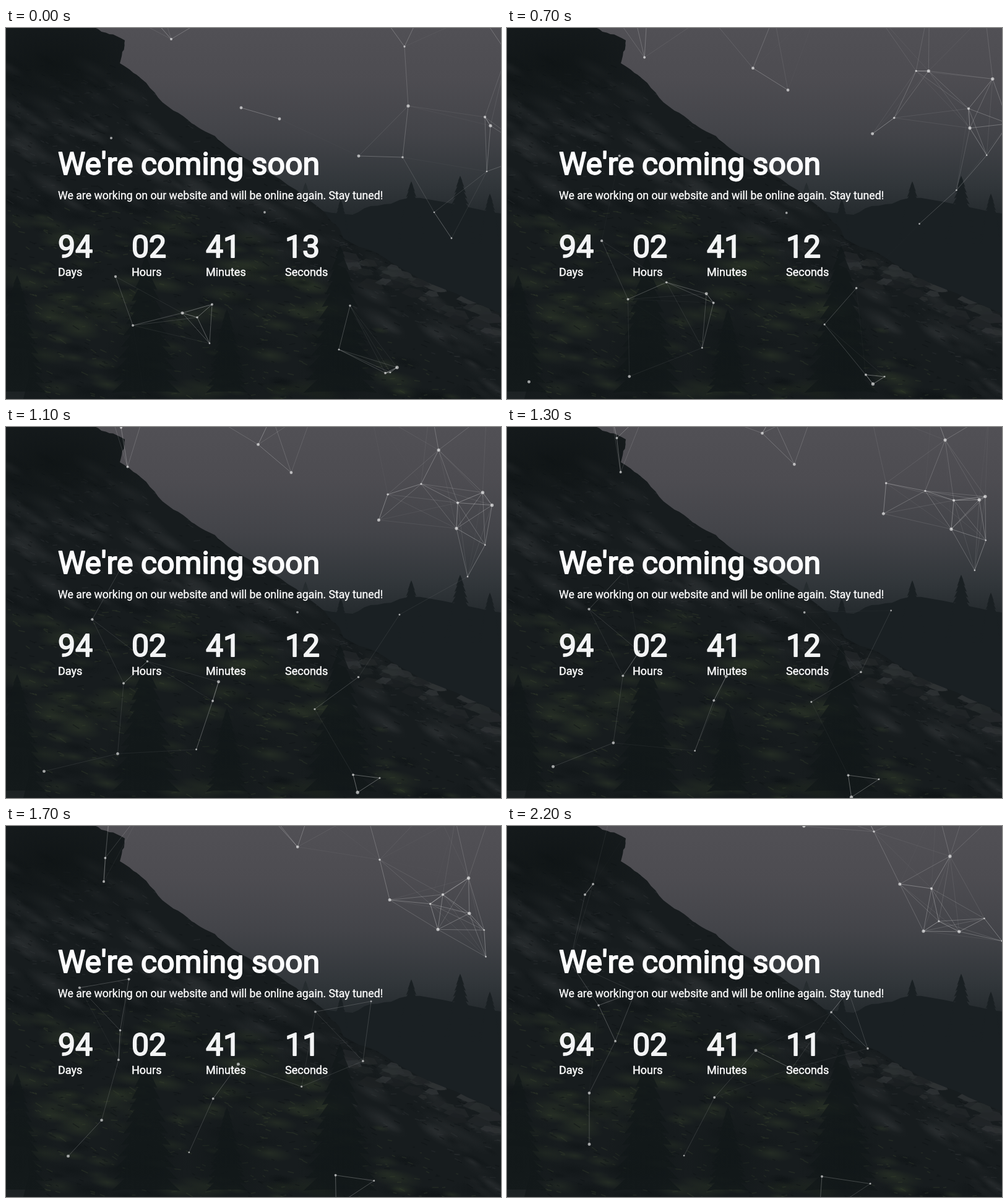
Recreate the animation shown at these times as an HTML page with a canvas. Size 800 px wide and 600 px high, loop 2.3 s.

```html
<!DOCTYPE html>
<html lang="en">
<head>
<meta charset="utf-8">
<title>Coming soon</title>
<style>
html, body { margin: 0; width: 100%; height: 100%; overflow: hidden; background: #161b1d; }
canvas { display: block; width: 800px; height: 600px; }
</style>
</head>
<body>
<canvas id="stage" width="800" height="600"></canvas>
<script>
const W = 800, H = 600, LOOP = 2300, STEP = 100, REACH = 150;
const ctx = document.getElementById('stage').getContext('2d');

function seeded(seed) {
  return (lo = 0, hi = 1) => {
    seed = (seed * 1664525 + 1013904223) % 4294967296;
    return lo + (hi - lo) * seed / 4294967296;
  };
}

// Start point and velocity per step of the leading dots
const leads = [
  [644, 30, 2.45, 5.64], [650, 126, 4.47, -8.07], [774, 144, -4, -1.95], [783, 158, -5, .55],
  [777, 232, -.25, -3.75], [570, 207, 2.95, -5.14], [641, 209, -2.18, -9.09], [692, 298, 4.91, -5.09],
  [720, 340, -7.64, -3.32], [855, 204, -6.32, -7.05], [810, 41, -3.6, 5.9],
  [267, 18, -6.41, 4.23], [233, -92, -4.27, 8.45], [170, 178, 1.68, 4.1], [177, 402, -3.42, -8.26],
  [380, 129, 2.5, -9.15], [442, 147, 1.72, -6.66], [418, 298, 4.82, .14],
  [205, 481, -1.36, -6.05], [285, 461, 5.32, -4.45], [309, 468, -7.32, -8.09], [333, 447, .1, -.36],
  [329, 510, -1.95, 1.05], [228, 625, -4.32, -8.78], [-10, 599, 6.5, -3.83], [556, 449, 1.23, -4.05],
  [538, 520, -3.55, -5.8], [632, 549, -5.8, 3.82], [621, 557, -1.54, .98], [613, 558, -4.73, .4]
];

function makeDots() {
  const rnd = seeded(7), dots = leads.map(d => [...d, rnd(1.3, 2.7)]);
  // Drifters just above the top edge catch the upper links
  for (let i = 0; i < 9; i++) {
    dots.push([60 + i * 90 + rnd(-20, 20), rnd(-40, -12), rnd(-2, 2), rnd(-.4, .4), 1.5]);
  }
  return dots;
}

// Outline through key points, roughened by midpoint displacement
function rough(pts, jag, rnd) {
  while (jag > 1) {
    pts = pts.flatMap((p, i) => {
      const q = pts[i + 1];
      if (!q) return [p];
      return [p, [(p[0] + q[0]) / 2 + rnd(-jag, jag), (p[1] + q[1]) / 2 + rnd(-jag, jag)]];
    });
    jag /= 2;
  }
  return pts;
}

function poly(g, color, pts) {
  g.fillStyle = color;
  g.beginPath();
  pts.forEach(([x, y]) => g.lineTo(x, y));
  g.fill();
}

// Soft elliptical patch of tone
function glow(g, x, y, rx, ry, rgb, alpha, tilt = 0) {
  g.save();
  g.translate(x, y);
  g.rotate(tilt);
  g.scale(rx, ry);
  const fade = g.createRadialGradient(0, 0, 0, 0, 0, 1);
  fade.addColorStop(0, `rgba(${rgb},${alpha})`);
  fade.addColorStop(1, `rgba(${rgb},0)`);
  g.fillStyle = fade;
  g.fillRect(-1, -1, 2, 2);
  g.restore();
}

function conifer(g, x, top, base, color) {
  const rows = 12, half = (base - top) * .25, side = [];
  for (let i = 1; i <= rows; i++) {
    const y = top + (base - top) * i / rows, w = half * Math.pow(i / rows, .8);
    side.push([w, y], [w * .65, y - 2]);
  }
  poly(g, color, [[x, top], ...side.map(([w, y]) => [x + w, y]),
    ...side.reverse().map(([w, y]) => [x - w, y])]);
}

function paintScene() {
  const c = document.createElement('canvas'), g = c.getContext('2d'), rnd = seeded(21);
  c.width = W;
  c.height = H;
  const sky = g.createLinearGradient(0, 0, 0, 340);
  ['#515055', '#4d4c51', '#434449', '#31363a', '#1b2124'].forEach((tone, i) => sky.addColorStop(i / 4, tone));
  g.fillStyle = sky;
  g.fillRect(0, 0, W, H);

  // Far forest
  poly(g, '#1a2023', [...rough([[440, 290], [560, 302], [650, 275], [800, 300]], 8, rnd), [800, 480], [500, 480]]);
  [[484, 250], [541, 277], [655, 248], [734, 239], [782, 268]]
    .forEach(([x, top], i) => conifer(g, x, top, 350, i ? '#1a2023' : '#262c2f'));

  // Main slope
  const ridge = rough([[145, 0], [192, 20], [184, 57], [240, 104], [300, 154], [350, 186], [420, 231],
    [515, 298], [545, 340], [650, 395], [800, 462]], 5, rnd);
  poly(g, '#171c1e', [[0, 0], ...ridge, [W, H], [0, H]]);
  g.save();
  g.clip();

  // Rock tones near the ridge, meadow tones below it
  for (let i = 0; i < 520; i++) {
    const x = rnd(0, W), y = rnd(40, H), depth = y - x * .66 + 30;
    if (depth < 0) continue;
    const size = rnd(8, 26), dark = rnd() < .4;
    const meadow = y > 290 && depth > 110;
    const tone = dark ? '13,18,20' : meadow ? '46,56,40' : '46,50,52';
    glow(g, x, y, size * 1.8, size * .6, tone, rnd(.25, .6), meadow ? .15 : .5);
  }
  // Fine blades and cracks
  g.lineWidth = 1.5;
  for (let i = 0; i < 1500; i++) {
    const x = rnd(0, W), y = rnd(60, H), len = rnd(3, 11);
    const meadow = y > 290 && y - x * .66 > 80;
    g.strokeStyle = rnd() < .5 ? 'rgba(14,19,20,.5)' : meadow ? 'rgba(56,66,47,.4)' : 'rgba(58,62,64,.28)';
    g.beginPath();
    g.moveTo(x, y);
    g.lineTo(x + len, y + len * rnd(-.2, .7));
    g.stroke();
  }
  glow(g, 80, 60, 170, 100, '14,19,20', .8);
  // Boulders along the right-hand ridge
  for (let i = 0; i < 45; i++) {
    const x = rnd(530, 800), y = x * .42 + 120 + rnd(4, 48), s = rnd(5, 15), grey = Math.floor(rnd(28, 50));
    poly(g, `rgba(${grey},${grey + 4},${grey + 6},.8)`,
      [[x - s * 1.4, y], [x - s * .4, y - s * .7], [x + s, y - s * .4], [x + s * 1.5, y + s * .5], [x, y + s * .6]]);
  }
  g.restore();
  poly(g, '#222729', [[0, 517], [32, 519], [38, 560], [28, 600], [0, 600]]);

  // Near trees
  [[18, 400], [226, 368], [357, 455], [540, 352]].forEach(([x, top]) => {
    conifer(g, x, top, 590, 'rgba(18,24,25,.8)');
    glow(g, x, 540, 70, 90, '17,23,24', .7);
  });
  return c;
}

const dots = makeDots(), scene = paintScene();

function drawNet(n) {
  const pos = dots.map(([x, y, vx, vy, r]) => ({ x: x + vx * n, y: y + vy * n, r }));
  ctx.lineWidth = 1;
  pos.forEach((a, i) => {
    for (const b of pos.slice(i + 1)) {
      const d = Math.hypot(a.x - b.x, a.y - b.y);
      if (d >= REACH) continue;
      ctx.strokeStyle = `rgba(255,255,255,${.44 * (1 - d / REACH)})`;
      ctx.beginPath();
      ctx.moveTo(a.x, a.y);
      ctx.lineTo(b.x, b.y);
      ctx.stroke();
    }
  });
  ctx.fillStyle = 'rgba(255,255,255,.6)';
  for (const p of pos) {
    ctx.beginPath();
    ctx.arc(p.x, p.y, p.r, 0, Math.PI * 2);
    ctx.fill();
  }
}

function label(text, x, y, size, color, extra) {
  ctx.font = `400 ${size}px Roboto, Arial, sans-serif`;
  ctx.fillStyle = ctx.strokeStyle = color;
  ctx.lineWidth = extra;
  ctx.lineJoin = 'round';
  ctx.fillText(text, x, y);
  ctx.strokeText(text, x, y);
}

function draw() {
  const n = Math.floor(performance.now() % LOOP / STEP);
  const seconds = 13 - Math.floor((n + 4) / 10);
  ctx.drawImage(scene, 0, 0);
  drawNet(n);
  label("We're coming soon", 84, 237, 50, '#fcfcfd', 1.9);
  label('We are working on our website and will be online again. Stay tuned!', 84, 277, 17.7, '#fff', .3);
  [[84, '94', 'Days'], [203, '02', 'Hours'], [323, '41', 'Minutes'], [451, String(seconds), 'Seconds']]
    .forEach(([x, value, unit]) => {
      label(value, x, 371, 50, '#f3f4f5', 1.9);
      label(unit, x, 401, 18, '#fafafa', .5);
    });
  requestAnimationFrame(draw);
}
draw();
</script>
</body>
</html>
```
